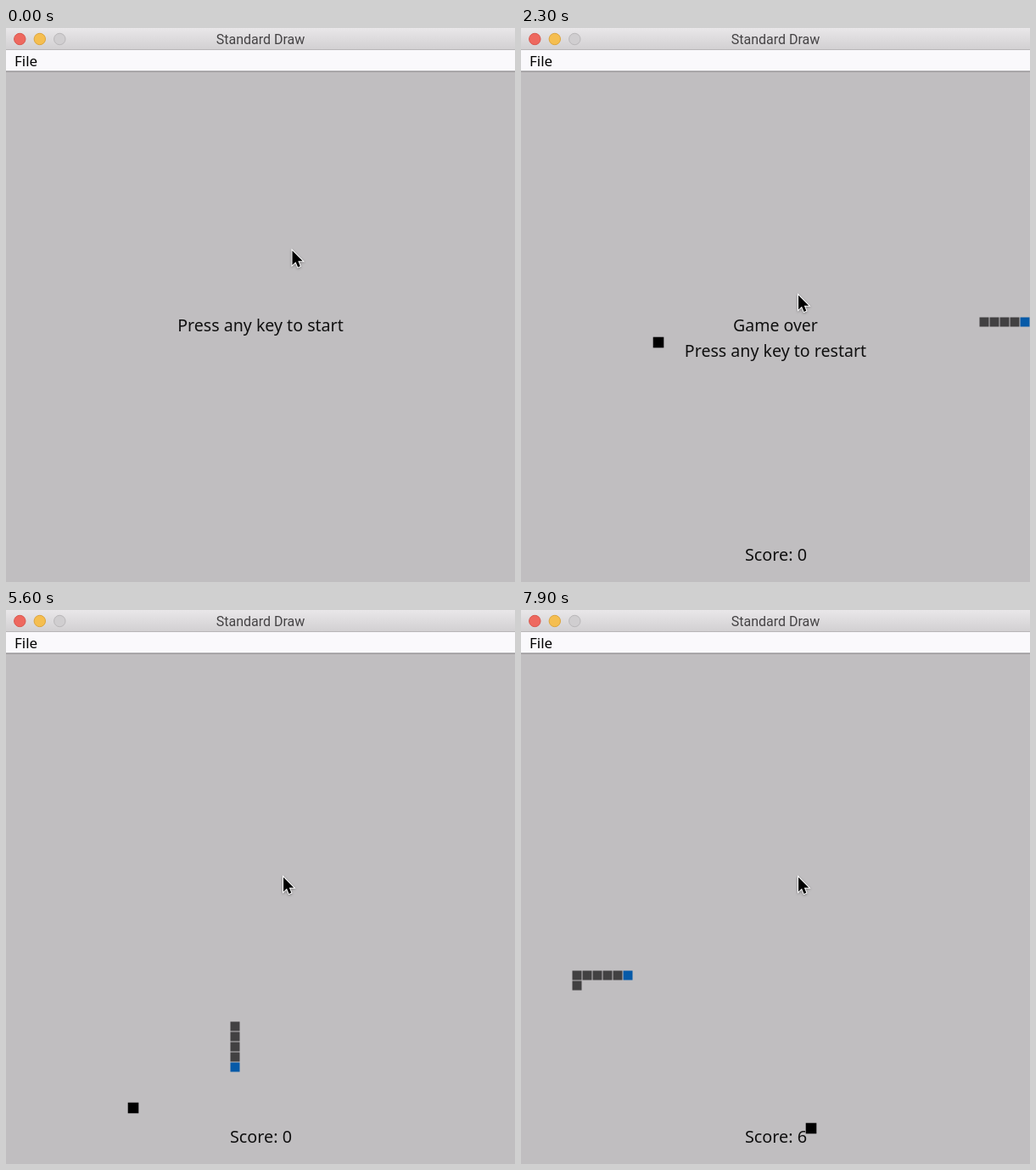
Recreate the animation shown at these times as an HTML page with a canvas. Size 600 by 652 pixels, loop 8000 ms.

```html
<!DOCTYPE html>
<html lang="en">
<head>
<meta charset="utf-8">
<title>Standard Draw</title>
<style>
  html, body { margin: 0; height: 100%; overflow: hidden; background: #c0bec0; }
  canvas { display: block; }
</style>
</head>
<body>
<canvas id="stage" width="600" height="652"></canvas>
<script>
const ctx = document.getElementById('stage').getContext('2d');
const LOOP = 8000, FRAME = 100, STEP = 60, CELL = 12, TOP = 52;
const SANS = '"Noto Sans", "Open Sans", sans-serif';

// Each game: start time, corners of the snake's route, food cells, steps at which food is eaten
const games = [
  { start: 900, corners: [[20, 24], [49, 24]], food: [[13, 26]], eats: [] },
  { start: 3400,
    corners: [[20, 24], [31, 24], [31, 20], [22, 20], [22, 44], [9, 44], [9, 36], [5, 36], [5, 31], [14, 31]],
    food: [[12, 44], [6, 31], [28, 46]], eats: [53, 74] }
];
for (const game of games) game.route = trace(game.corners);

function trace(corners) {
  let [x, y] = corners[0];
  const cells = [[x, y]];
  for (const [cx, cy] of corners) {
    while (x !== cx || y !== cy) {
      x += Math.sign(cx - x);
      y += Math.sign(cy - y);
      cells.push([x, y]);
    }
  }
  return cells;
}

function text(str, x, y, size, color = '#101010', align = 'center', family = SANS) {
  ctx.font = `${size}px ${family}`;
  ctx.textAlign = align;
  ctx.fillStyle = color;
  ctx.fillText(str, x, y);
}

function square([i, j], size, color) {
  const inset = (CELL - size) / 2;
  ctx.fillStyle = color;
  ctx.fillRect(i * CELL + inset, TOP + j * CELL + inset, size, size);
}

function button(x, fill, edge) {
  ctx.beginPath();
  ctx.arc(x, 13, 6.7, 0, 7);
  ctx.fillStyle = fill;
  ctx.fill();
  ctx.strokeStyle = edge;
  ctx.lineWidth = 1;
  ctx.stroke();
}

function drawWindow() {
  ctx.fillStyle = '#c0bec0';
  ctx.fillRect(0, 0, 600, 652);
  const bar = ctx.createLinearGradient(0, 0, 0, 25);
  bar.addColorStop(0, '#e9e7e9');
  bar.addColorStop(1, '#d2d0d2');
  ctx.fillStyle = bar;
  ctx.fillRect(0, 0, 600, 25);
  ctx.fillStyle = '#b8b6b8';
  ctx.fillRect(0, 25, 600, 1);
  ctx.fillStyle = '#faf9fc';
  ctx.fillRect(0, 26, 600, 25);
  ctx.fillStyle = '#7c7a7c';
  ctx.fillRect(0, 50.5, 600, 1);
  button(16.3, '#ee685f', '#d9554c');
  button(39.8, '#f5be50', '#dca43c');
  button(63.3, '#d0ced0', '#b9b7b9');
  text('Standard Draw', 300, 18.5, 16, '#454345', 'center', 'Roboto, Inter, sans-serif');
  text('File', 10, 45, 17, '#000', 'left');
}

function drawGame(t) {
  const game = games[t < games[1].start ? 0 : 1];
  const step = Math.floor((t - game.start) / STEP + 3.17);
  const head = Math.min(step + 5, game.route.length - 1);
  const eaten = game.eats.filter(s => step >= s).length;
  text('Score: ' + 3 * eaten, 300.5, 626.5, 19.8);
  square(game.food[eaten], 12.6, '#000');
  game.route.slice(head - 4 - eaten, head).forEach(c => square(c, 11, '#424142'));
  square(game.route[head], 11, '#065aa8');
  if (game === games[0] && t >= 2300) {
    text('Game over', 300, 357, 19.5);
    text('Press any key to restart', 300, 387, 19.6);
  }
}

const arrow = new Path2D('M0 0V17L4 13.3L6.6 19.4L9.3 18.2L6.8 12.3H12.2Z');

function drawPointer(t) {
  const p = Math.min(1, Math.max(0, (t - 100) / 700));
  const ease = p * p * (3 - 2 * p);
  ctx.save();
  ctx.translate(337.5 - 10.5 * ease, 262 + 52.5 * ease);
  ctx.shadowColor = 'rgba(0,0,0,.35)';
  ctx.shadowBlur = 3;
  ctx.shadowOffsetY = 1;
  ctx.strokeStyle = '#fff';
  ctx.lineWidth = 2;
  ctx.stroke(arrow);
  ctx.shadowColor = 'transparent';
  ctx.fillStyle = '#000';
  ctx.fill(arrow);
  ctx.restore();
}

function draw(now) {
  const t = Math.floor(now % LOOP / FRAME) * FRAME;
  drawWindow();
  if (t < games[0].start) text('Press any key to start', 300, 357, 19.6);
  else drawGame(t);
  drawPointer(t);
}

let origin;
function tick(now) {
  origin ??= now;
  draw(now - origin);
  requestAnimationFrame(tick);
}
draw(0);
requestAnimationFrame(tick);
</script>
</body>
</html>
```
